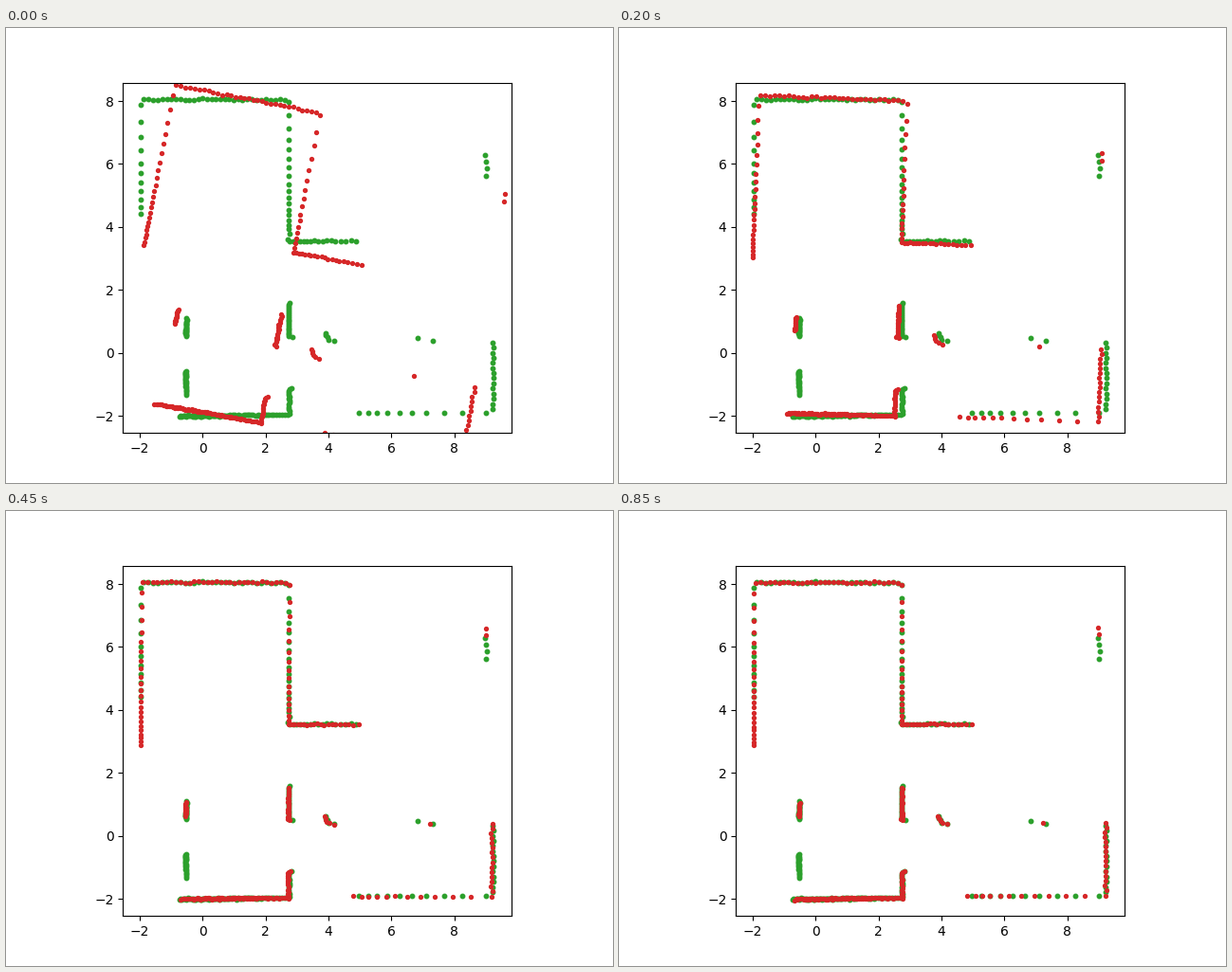
Recreate the animation shown at these times as a matplotlib script. Size 640x480 px, loop 1 s.

```python
import matplotlib.pyplot as plt
import numpy as np
from matplotlib.animation import FuncAnimation

FRAMES = 20
INTERVAL = 50
LAST_STEP = 17
RANGE_NOISE = 0.014
FIELD_OF_VIEW = np.arange(-132, 135)  # one ray per degree
PIVOT = np.array([4.82, 2.823])
rng = np.random.default_rng(4)

# Floor plan, each entry a chain of corners
ROOM = [(-1.965, 2.6), (-1.965, 8.05), (2.74, 8.05), (2.74, 3.55), (5.0, 3.55)]
SOUTH_WALL = [(-1.2, -2.02), (2.75, -1.97), (2.74, -1.16), (2.83, -1.13)]
DOOR_POST = [(2.84, 0.495), (2.74, 0.53), (2.74, 1.59)]
WEST_POSTS = [[(-0.50, 1.08), (-0.54, 0.45)], [(-0.54, -0.45), (-0.52, -1.38)]]
EAST_ROOM = [(2.9, -1.91), (9.22, -1.91), (9.22, 0.43)]
CLUTTER = [[(3.88, 0.66), (3.98, 0.43), (4.36, 0.33)],
           [(6.82, 0.486), (7.38, 0.375)],
           [(9.0, 5.5), (9.0, 7.0)]]
CHAINS = [ROOM, SOUTH_WALL, DOOR_POST, EAST_ROOM, *WEST_POSTS, *CLUTTER]
SEGMENTS = np.array([pair for chain in CHAINS for pair in zip(chain, chain[1:])])


def cross(a, b):
    return a[..., 0] * b[..., 1] - a[..., 1] * b[..., 0]


def scan(sensor, heading):
    """Nearest wall hit of every ray, with a little range noise."""
    angles = np.radians(FIELD_OF_VIEW + heading)
    rays = np.column_stack([np.cos(angles), np.sin(angles)])
    start = SEGMENTS[:, 0] - sensor
    edge = SEGMENTS[:, 1] - SEGMENTS[:, 0]
    facing = cross(rays[:, None], edge)
    reach = cross(start, edge) / facing
    along = cross(start, rays[:, None]) / facing
    hit = (reach > 0) & (along >= 0) & (along <= 1)
    nearest = np.where(hit, reach, np.inf).min(axis=1)
    seen = np.isfinite(nearest)
    distance = nearest[seen] + rng.normal(0, RANGE_NOISE, seen.sum())
    return np.array(sensor) + rays[seen] * distance[:, None]


reference = scan((0, 0), 0)
aligned = scan((0.5, -0.12), 10.5)


def moving_scan(step):
    """The second scan with the misalignment left after some iterations."""
    tilt = np.radians(10.93) * np.exp(-0.375 * step - 0.004 * step ** 2)
    drop = 0.727 * np.exp(-0.445 * step)
    slide = (0.03 + 0.186 * step) * np.exp(-0.7 * step)
    c, s = np.cos(tilt), np.sin(tilt)
    turn = np.array([[c, -s], [s, c]])
    return (aligned - PIVOT) @ turn + PIVOT - (slide, drop)


fig, ax = plt.subplots(figsize=(6.4, 4.8), dpi=100)
ax.set_aspect("equal")
ax.set_xlim(-2.53, 9.81)
ax.set_ylim(-2.548, 8.587)
ax.set_xticks(range(-2, 9, 2))
ax.set_yticks(range(-2, 9, 2))
ax.plot(*reference.T, ".", color="tab:green", markersize=6.4)
dots, = ax.plot([], [], ".", color="tab:red", markersize=5.6)


def update(frame):
    dots.set_data(*moving_scan(min(frame, LAST_STEP)).T)
    return dots,


anim = FuncAnimation(fig, update, frames=FRAMES, interval=INTERVAL,
                     repeat=True, repeat_delay=0)
plt.show()
```
